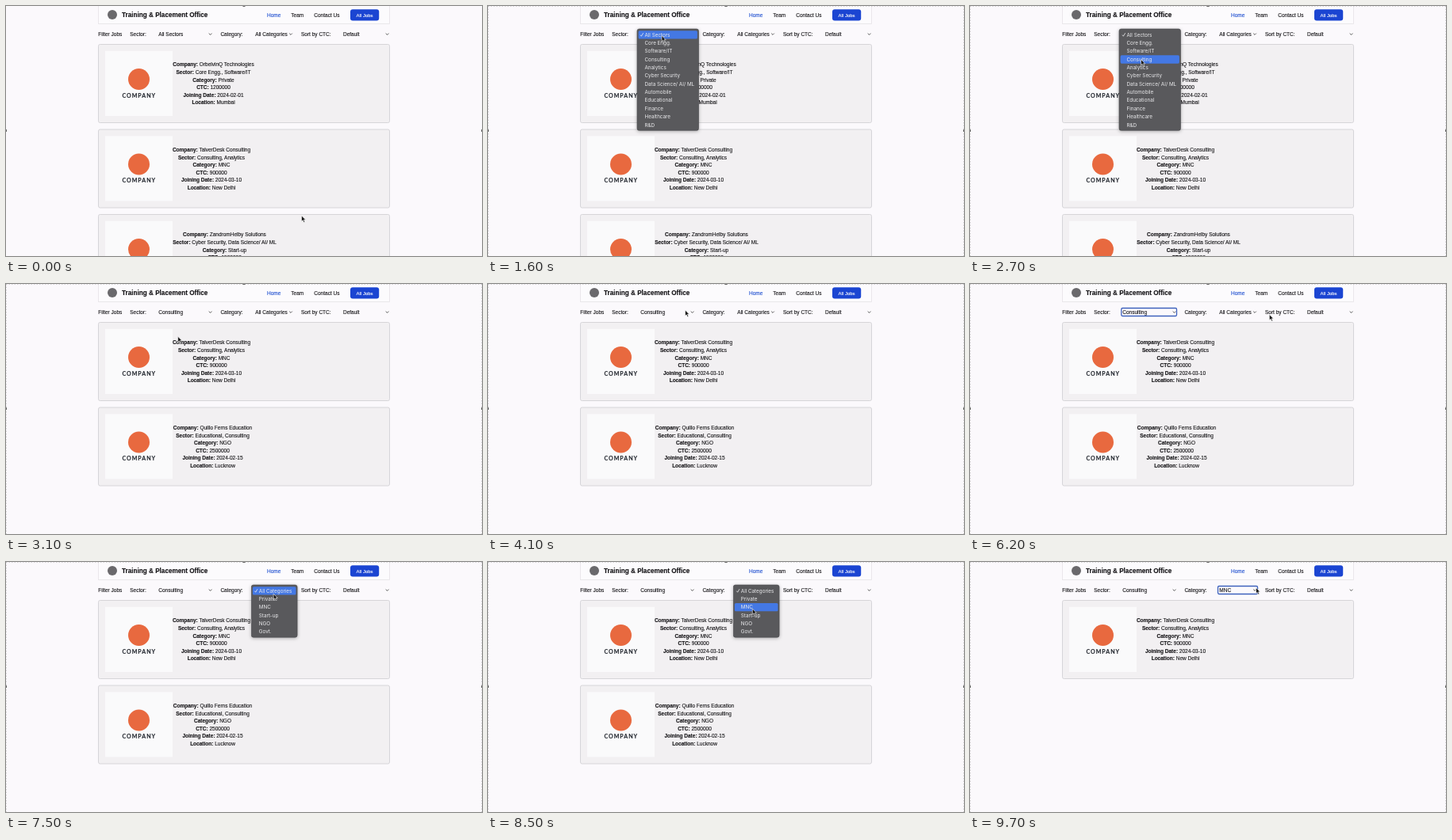
Animation of 600 by 316 pixels, one loop 9.8 s. Source, as an HTML page:

```html
<!DOCTYPE html>
<html lang="en">
<head>
<meta charset="utf-8">
<title>Training &amp; Placement Office</title>
<style>
html, body { margin: 0; width: 100%; height: 100%; overflow: hidden; background: #fbf9fc; }
svg { display: block; width: 600px; height: 316px; }
text { font: 6.5px "Liberation Sans", Arial, sans-serif; fill: #151417; stroke: #151417; stroke-width: .12; white-space: pre; }
.b { font-weight: 700; }
.mid { text-anchor: middle; }
.title { font-size: 8.17px; font-weight: 700; }
.brand { font: 700 7px Lato, sans-serif; letter-spacing: 1px; fill: #22262e; stroke: #22262e; }
.link { fill: #1f4fd0; stroke: #1f4fd0; }
.button { font-size: 6px; fill: #fff; stroke: #fff; }
.item { font: 6.3px Inter, sans-serif; fill: #ececee; stroke: none; }
.menu { filter: drop-shadow(0 1px 2px rgba(0, 0, 0, .3)); }
.line { fill: none; stroke: #333; stroke-width: .8; }
</style>
</head>
<body>
<svg id="stage" viewBox="0 0 600 316"></svg>
<script>
const LOOP = 9800;
const stage = document.getElementById('stage');

function el(tag, attrs, parent = stage, content) {
  const node = document.createElementNS('http://www.w3.org/2000/svg', tag);
  for (const key in attrs) node.setAttribute(key, attrs[key]);
  if (content !== undefined) node.textContent = content;
  parent.appendChild(node);
  return node;
}
const rect = (x, y, width, height, fill, more, parent) =>
  el('rect', { x, y, width, height, fill, ...more }, parent);
const label = (x, y, content, cls = '', parent) =>
  el('text', { x, y, class: cls }, parent, content);
const show = (node, on) => node.setAttribute('visibility', on ? 'visible' : 'hidden');

// Page and header
rect(0, 0, 600, 316, '#fbf9fc');
rect(116.5, -2, 367, 24.5, '#fcfbfd', { stroke: '#e5e3e7', 'stroke-width': .8 });
el('circle', { cx: 134, cy: 11, r: 6, fill: '#6a696c' });
label(146, 14.2, 'Training & Placement Office', 'title');
label(329, 13.8, 'Home', 'link');
label(359.3, 13.8, 'Team');
label(388.3, 13.8, 'Contact Us');
rect(434, 4.2, 36.2, 14.4, '#1b45d2', { rx: 3 });
label(452.1, 13.6, 'All Jobs', 'mid button');

// Filter bar
label(116.3, 37.8, 'Filter Jobs');
label(156.2, 37.8, 'Sector:');
const sectorText = label(192.3, 37.8, 'All Sectors');
label(270.4, 37.8, 'Category:');
const categoryText = label(314.3, 37.8, 'All Categories');
label(372, 37.8, 'Sort by CTC:');
label(425, 37.8, 'Default');
for (const x of [257.5, 359, 480.5])
  el('path', { d: `M${x - 1.8} 34.6l1.8 1.8l1.8-1.8`, class: 'line' });

const ring = (x, width) => rect(x, 30.5, width, 10, 'none',
  { rx: 1.4, stroke: '#3f62bd', 'stroke-width': 1.3 });
const sectorRing = ring(190.8, 69.7);
const categoryRing = ring(312.5, 50);

// Job cards
const FIELDS = ['Company', 'Sector', 'Category', 'CTC', 'Joining Date', 'Location'];
const JOBS = [
  [261.5, 'OrbelvinQ Technologies', 'Core Engg., Software/IT', 'Private', '1200000', '2024-02-01', 'Mumbai'],
  [259, 'TalverDesk Consulting', 'Consulting, Analytics', 'MNC', '900000', '2024-03-10', 'New Delhi'],
  [275.5, 'ZandromHelby Solutions', 'Cyber Security, Data Science/ AI/ ML', 'Start-up', '1500000', '2024-01-20', 'Pune'],
  [260.5, 'Quillo Ferns Education', 'Educational, Consulting', 'NGO', '2500000', '2024-02-15', 'Lucknow']
];
const cards = JOBS.map(([cx, ...values]) => {
  const g = el('g', {});
  rect(116.5, 48.5, 367, 99, '#f2f0f2', { rx: 2, stroke: '#d3d2d5', 'stroke-width': .9 }, g);
  rect(125, 56.8, 85, 82.2, '#fafafb', {}, g);
  el('circle', { cx: 167.5, cy: 92.5, r: 13.5, fill: '#e8693f' }, g);
  label(167.8, 115.8, 'COMPANY', 'brand mid', g);
  values.forEach((value, i) => {
    const line = label(cx, 76.4 + i * 9.6, undefined, 'mid', g);
    el('tspan', { class: 'b' }, line, FIELDS[i] + ':');
    el('tspan', {}, line, ' ' + value);
  });
  return g;
});

// Drop-down menus
const TOP = 31.2, STEP = 10.36;
function menu(x, width, items) {
  const g = el('g', {});
  rect(x, 29, width, items.length * STEP + 4, '#59595c',
    { rx: 2.6, stroke: '#47474a', 'stroke-width': .6, class: 'menu' }, g);
  const bar = rect(x + 1.6, 0, width - 3.2, STEP, '#4478e4', { rx: 1.6 }, g);
  el('path', { d: `M${x + 4} 36.6l1.3 1.6l2.4-4`, class: 'line', style: 'stroke:#f0f0f2' }, g);
  items.forEach((item, i) => label(x + 9.5, TOP + i * STEP + 7.4, item, 'item', g));
  return (open, y) => {
    show(g, open);
    const i = Math.max(0, Math.min(items.length - 1, Math.floor((y - TOP) / STEP)));
    bar.setAttribute('y', TOP + i * STEP);
  };
}
const sectorMenu = menu(188, 77.5, ['All Sectors', 'Core Engg.', 'Software/IT', 'Consulting',
  'Analytics', 'Cyber Security', 'Data Science/ AI/ ML', 'Automobile', 'Educational',
  'Finance', 'Healthcare', 'R&D']);
const categoryMenu = menu(309.3, 57.8, ['All Categories', 'Private', 'MNC', 'Start-up', 'NGO', 'Govt.']);

// Dotted outline of the recorded area with side handles
const outline = el('path', {
  d: 'M0 .4H600M.4 0V316M599.6 0V316', fill: 'none',
  stroke: '#bdbcbf', 'stroke-width': .7, 'stroke-dasharray': '1.5 2'
});
el('path', { d: 'M298.5 .4h3M.4 156v3M599.6 156v3', fill: 'none', stroke: '#555' });

const cursor = el('path', {
  d: 'M0 0V7.3L1.7 5.8L2.9 8.5L4.2 7.9L3 5.3H5.2Z',
  fill: '#151515', stroke: '#fff', 'stroke-width': .6, 'stroke-linejoin': 'round'
});

// Moments of the clicks
const OPEN_SECTOR = 1100, PICK_SECTOR = 3000, FOCUS_SECTOR = 5000;
const OPEN_CATEGORY = 7200, PICK_CATEGORY = 8700, FOCUS_CATEGORY = 9300;

// Pointer moves: start, end, x, y reached
const MOVES = [
  [200, 1000, 219, 37.5],
  [1600, 2500, 215.5, 67.5],
  [PICK_SECTOR, 3900, 248.5, 33],
  [FOCUS_SECTOR, 6100, 377.3, 38.5],
  [6300, 7000, 338, 36],
  [OPEN_CATEGORY, 8300, 333.3, 59],
  [PICK_CATEGORY, FOCUS_CATEGORY, 360.5, 32.5]
];
function pointer(t) {
  let x = 372.5, y = 265;
  for (const [from, to, nx, ny] of MOVES) {
    const u = Math.max(0, Math.min(1, (t - from) / (to - from)));
    const e = u * u * (3 - 2 * u);
    x += (nx - x) * e;
    y += (ny - y) * e;
  }
  return [x, y];
}

const HELD = [0, 10, 18, 27, 36, 46, 55, 64, 73, 82, 91];

function draw(ms) {
  let tick = Math.floor(ms / 100);
  if (HELD.includes(tick - 1)) tick--;
  const t = tick * 100;
  const [x, y] = pointer(t);
  const bySector = t >= PICK_SECTOR, byCategory = t >= PICK_CATEGORY;

  cursor.setAttribute('transform', `translate(${x} ${y})`);
  show(outline, t >= 200);
  sectorText.textContent = bySector ? 'Consulting' : 'All Sectors';
  categoryText.textContent = byCategory ? 'MNC' : 'All Categories';
  sectorMenu(t >= OPEN_SECTOR && !bySector, y);
  categoryMenu(t >= OPEN_CATEGORY && !byCategory, y);
  show(sectorRing, t >= FOCUS_SECTOR && t < OPEN_CATEGORY);
  show(categoryRing, t >= FOCUS_CATEGORY);

  const list = byCategory ? [1] : bySector ? [1, 3] : [0, 1, 2];
  cards.forEach((card, i) => {
    const slot = list.indexOf(i);
    show(card, slot >= 0);
    card.setAttribute('transform', `translate(0 ${Math.max(0, slot) * 107.5})`);
  });
}

const start = performance.now();
function frame(now) {
  draw(Math.max(0, now - start) % LOOP);
  requestAnimationFrame(frame);
}
draw(0);
requestAnimationFrame(frame);
</script>
</body>
</html>
```
